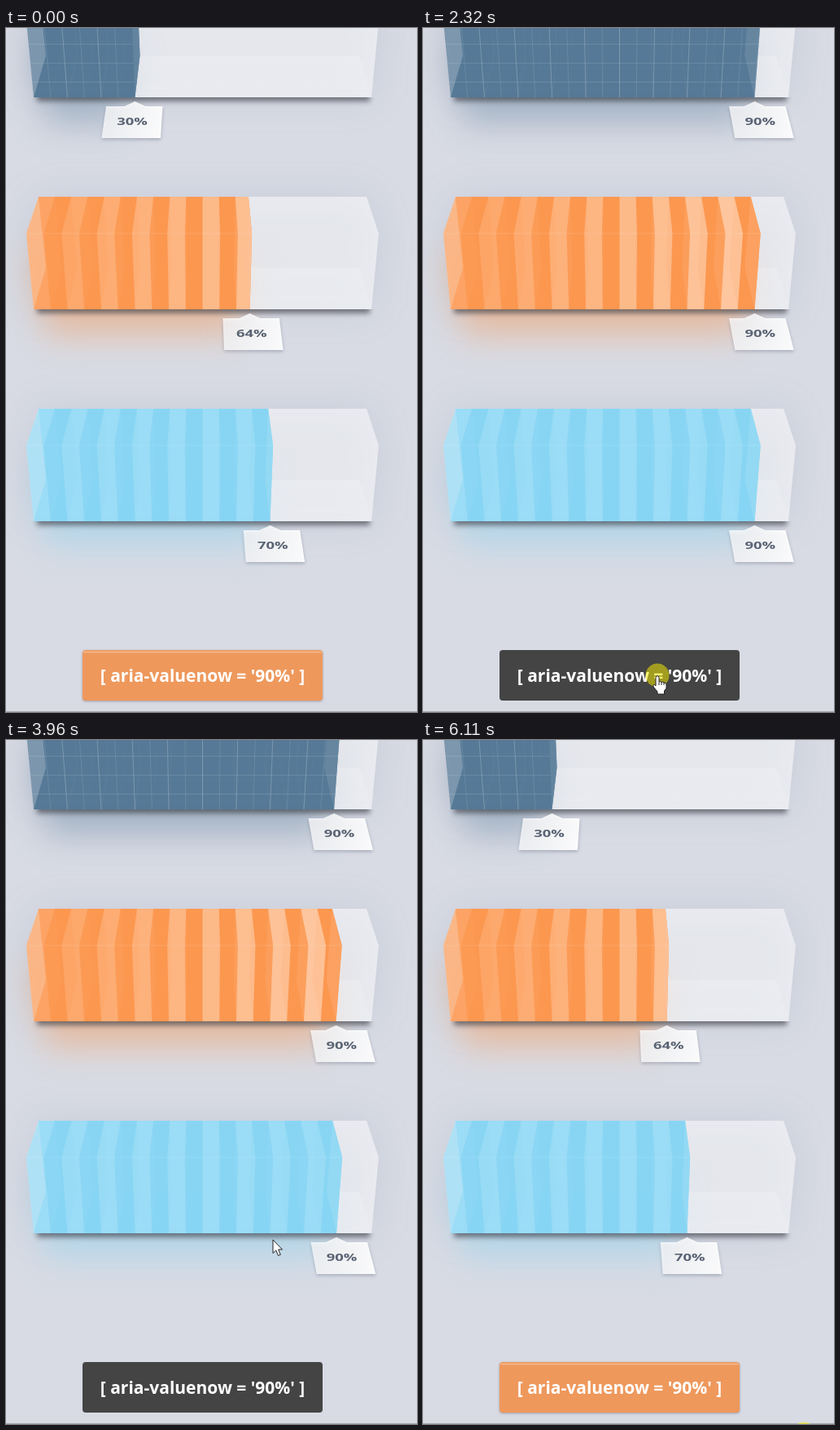
Write an HTML page with a canvas that moves like this. It is 505 px wide and 839 px high and loops after 6190 ms.

```html
<!DOCTYPE html>
<html lang="en">
<head>
<meta charset="utf-8">
<title>Progress bars</title>
<style>
html, body { margin: 0; width: 100%; height: 100%; overflow: hidden; background: #d8dbe4; }
canvas { display: block; }
</style>
</head>
<body>
<canvas width="505" height="839"></canvas>
<script>
const ctx = document.querySelector('canvas').getContext('2d');
const LOOP = 6190, DURATION = 600;
const FONT = '"Open Sans", "Noto Sans", sans-serif';
const toggles = [970, 2420, 3465, 5056];
const clicks = [[850, 970], [2320, 2420], [3370, 3465], [4950, 5056]];
const route = [[360, 478, 716], [640, 288, 795], [3520, 288, 795], [3960, 328, 613],
  [4250, 343, 604], [4600, 328, 698], [4900, 319, 800], [5260, 319, 800], [5620, 430, 842]];

const bars = [
  { y: -53, value: .3, rgb: '83,119,149', glow: .36, grid: true },
  { y: 207, value: .64, rgb: '253,150,77', glow: .42, shine: p => .1 + .38 * p },
  { y: 467, value: .7, rgb: '134,213,244', glow: .38, shine: () => .14 }
];

// Box edges in perspective: left end, length and height of each
const backTop = [40, 403, 0], frontTop = [25, 433, 45];
const frontBase = [34, 415, 138], backBase = [49, 385, 87];
const at = ([x, w, y], p) => [x + w * p, y];

const white = a => `rgba(255,255,255,${a})`;

function poly(points, fill) {
  ctx.beginPath();
  for (const q of points) ctx.lineTo(...q);
  ctx.closePath();
  ctx.fillStyle = fill;
  ctx.fill();
}

const face = (a, b, from, to, fill) =>
  poly([at(a, from), at(a, to), at(b, to), at(b, from)], fill);

const endCap = (p, fill) =>
  poly([backTop, frontTop, frontBase, backBase].map(e => at(e, p)), fill);

function line(a, b, alpha) {
  ctx.beginPath();
  ctx.moveTo(...a);
  ctx.lineTo(...b);
  ctx.strokeStyle = white(alpha);
  ctx.lineWidth = 1;
  ctx.stroke();
}

function blurred(radius, draw) {
  ctx.filter = `blur(${radius}px)`;
  draw();
  ctx.filter = 'none';
}

// CSS "ease" curve
function ease(x) {
  if (x <= 0 || x >= 1) return x <= 0 ? 0 : 1;
  let lo = 0, hi = 1;
  const curve = (s, a, b) => 3 * s * (1 - s) ** 2 * a + 3 * s * s * (1 - s) * b + s ** 3;
  for (let i = 0; i < 20; i++) {
    const mid = (lo + hi) / 2;
    if (curve(mid, .25, .25) < x) lo = mid; else hi = mid;
  }
  return curve(lo, .1, 1);
}

function mesh(a, b, p, alpha) {
  for (let i = 1; i * .05 < p; i++) {
    line(at(a, i * .05), at(b, i * .05), i % 2 ? alpha * .5 : alpha);
  }
  for (const k of [.3, .55, .8]) {
    const mix = a.map((v, i) => v + (b[i] - v) * k);
    line(at(mix, 0), at(mix, p), alpha * .6);
  }
}

function surface(bar, a, b, p, alpha) {
  face(a, b, 0, p, `rgba(${bar.rgb},${alpha})`);
  if (bar.grid) return mesh(a, b, p, .22);
  for (let s = 0; s < p; s += .1) {
    face(a, b, s, Math.min(s + .05, p), white(bar.shine(s)));
  }
}

function drawLabel(p, text) {
  const top = 123 + 421.7 * (p - .3), base = 117.5 + 443 * (p - .3), tip = 34 + 415 * p;
  const fill = ctx.createLinearGradient(base, 165, base + 74, 180);
  fill.addColorStop(0, white(.76));
  fill.addColorStop(1, white(.95));
  ctx.shadowColor = 'rgba(60,70,95,.35)';
  ctx.shadowBlur = 4;
  ctx.shadowOffsetY = 2;
  poly([[top, 149], [tip - 13, 149], [tip, 143], [tip + 13, 149], [top + 69.5, 149],
    [base + 72.5, 188], [base, 188]], fill);
  ctx.shadowColor = 'transparent';
  ctx.save();
  ctx.translate(155 + 432 * (p - .3), 172);
  ctx.scale(1, .66); // tilted away from the viewer
  ctx.font = `bold 18.4px ${FONT}`;
  ctx.textAlign = 'center';
  ctx.fillStyle = '#596373';
  ctx.fillText(text, 0, 0);
  ctx.restore();
}

function drawBar(bar, amount, on) {
  const p = bar.value + (.9 - bar.value) * amount;
  const outline = [at(backTop, 0), at(backTop, 1), at(frontTop, 1),
    at(frontBase, 1), at(frontBase, 0), at(frontTop, 0)];
  ctx.save();
  ctx.translate(0, bar.y);

  blurred(22, () => poly(outline, 'rgba(120,130,155,.16)'));
  blurred(20, () => poly([[30, 70], [30 + 415 * p, 70], [20 + 415 * p, 170], [50, 170]],
    `rgba(${bar.rgb},${bar.glow})`));
  ctx.save();
  ctx.beginPath();
  ctx.rect(0, 138, 505, 40);
  ctx.clip();
  blurred(3, () => poly([[38, 130], [447, 130], [447, 143], [38, 143]], 'rgba(50,52,60,.6)'));
  ctx.restore();

  poly(outline, white(.53));
  const floor = ctx.createLinearGradient(0, 87, 0, 138);
  floor.addColorStop(0, white(.18));
  floor.addColorStop(1, white(.04));
  face(backBase, frontBase, 0, 1, floor);

  surface(bar, backTop, backBase, p, .9);
  surface(bar, backBase, frontBase, p, .9);
  endCap(p, `rgba(${bar.rgb},.85)`);
  surface(bar, backTop, frontTop, p, .8);
  surface(bar, frontTop, frontBase, p, .8);
  line(at(frontTop, 0), at(frontTop, p), .12);
  endCap(0, white(.09));
  endCap(p, white(.09));

  drawLabel(p, on ? '90%' : Math.round(bar.value * 100) + '%');
  ctx.restore();
}

function roundRect(x, y, w, h, r, fill) {
  ctx.beginPath();
  ctx.roundRect(x, y, w, h, r);
  ctx.fillStyle = fill;
  ctx.fill();
}

function drawButton(on) {
  ctx.shadowColor = 'rgba(70,60,60,.4)';
  ctx.shadowBlur = on ? 0 : 3;
  ctx.shadowOffsetY = on ? 0 : 1;
  roundRect(94, 763, 295, 62, 4, on ? '#444' : '#ee985c');
  ctx.shadowColor = 'transparent';
  if (!on) roundRect(95, 764.5, 293, 2, 1, '#f5b585');
  ctx.font = `bold 21px ${FONT}`;
  ctx.textAlign = 'center';
  ctx.fillStyle = '#fff';
  ctx.fillText("[ aria-valuenow = '90%' ]", 241.5, 802);
}

const arrow = new Path2D('M0 0V16.5L3.8 13L6.5 19.5L9.3 18.3L6.6 12H11.5Z');
const hand = new Path2D('M-2 1Q0-2 2 1V7Q4 6 5 7.5Q7 6.5 8 8Q10.5 7.5 11 10V15L8.5 18V22H0V19L-5 13Q-5.500 10-3.500 10.500L-2 12Z');

function spot(x, y) {
  ctx.beginPath();
  ctx.arc(x, y, 14.5, 0, 7);
  ctx.fillStyle = 'rgba(250,240,0,.52)';
  ctx.fill();
}

function drawCursor(t) {
  if (t >= 6110) spot(468, 851);
  const i = route.findIndex(k => k[0] > t);
  if (i < 1) return;
  const [t0, x0, y0] = route[i - 1], [t1, x1, y1] = route[i];
  const u = (t - t0) / (t1 - t0), k = u * u * (3 - 2 * u);
  const x = x0 + (x1 - x0) * k, y = y0 + (y1 - y0) * k;
  if (clicks.some(([a, b]) => t >= a && t < b)) spot(x, y - 1);
  const over = x > 94 && x < 389 && y > 763 && y < 825;
  ctx.save();
  ctx.translate(x, y);
  ctx.fillStyle = '#fff';
  ctx.strokeStyle = '#222';
  ctx.lineWidth = 1;
  ctx.fill(over ? hand : arrow);
  ctx.stroke(over ? hand : arrow);
  if (over) {
    ctx.beginPath();
    for (const fx of [2, 5, 8]) {
      ctx.moveTo(fx, 7.5);
      ctx.lineTo(fx, 11);
    }
    ctx.stroke();
  }
  ctx.restore();
}

function draw(now) {
  const t = now % LOOP;
  const passed = toggles.filter(s => s <= t);
  const on = passed.length % 2 === 1;
  const k = passed.length ? ease((t - passed[passed.length - 1]) / DURATION) : 1;
  ctx.fillStyle = '#d8dbe4';
  ctx.fillRect(0, 0, 505, 839);
  for (const bar of bars) drawBar(bar, on ? k : 1 - k, on);
  drawButton(on);
  ctx.fillStyle = '#a6a8ad';
  ctx.fillRect(0, 838, 505, 1);
  drawCursor(t);
}

const start = performance.now();
function tick() {
  draw(performance.now() - start);
  requestAnimationFrame(tick);
}
tick();
</script>
</body>
</html>
```
